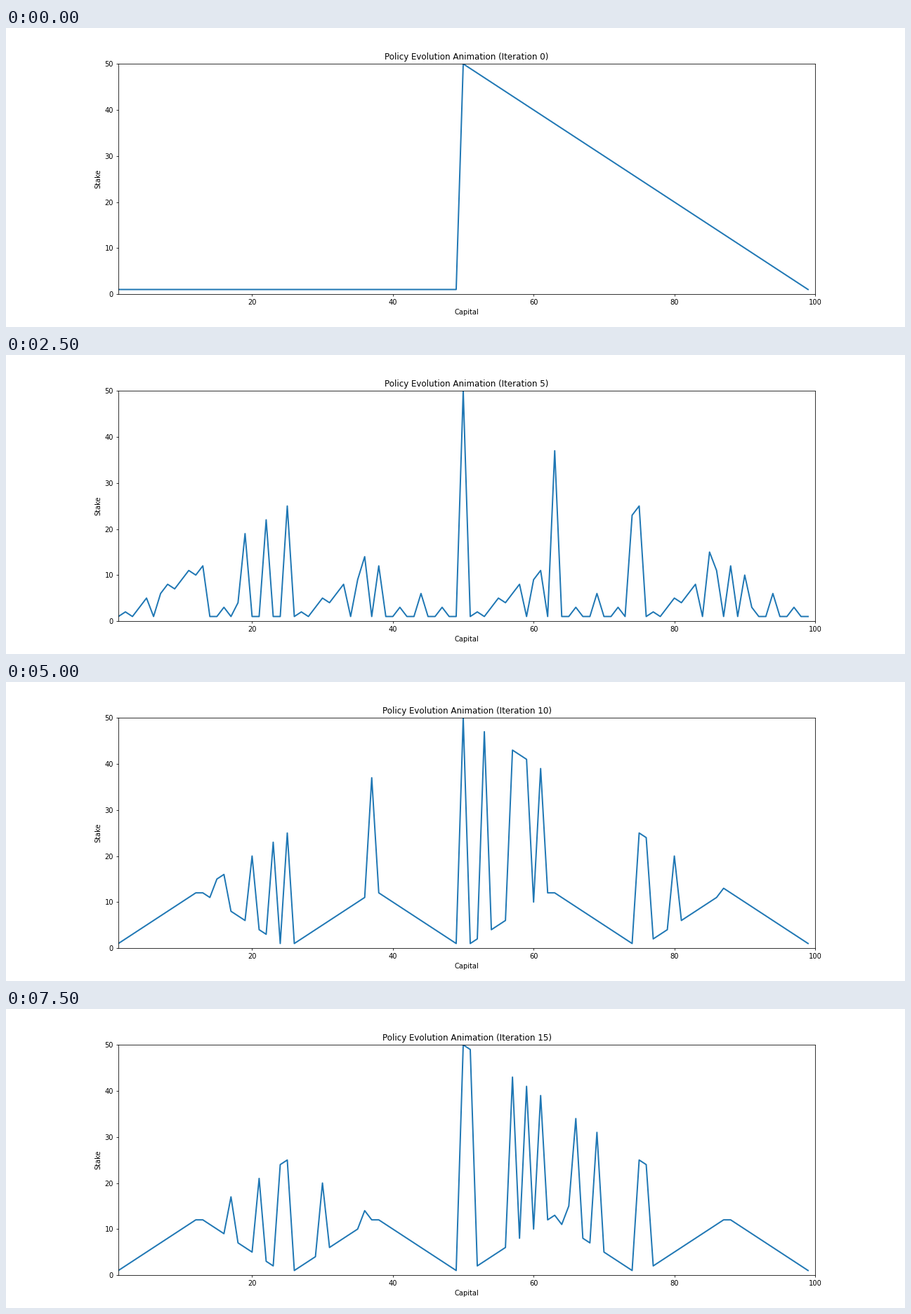
A matplotlib script for the animation above (8 s loop, 1280x427 px).

```python
import numpy as np
import matplotlib.pyplot as plt
from matplotlib.animation import FuncAnimation

WIDTH, HEIGHT = 1280, 427
DPI = WIDTH / 18
GOAL = 100
P_HEADS = 0.4
ITERATIONS = 16
INTERVAL = 500  # ms


def sweep(values):
    """One synchronous value-iteration sweep of the gambler's problem."""
    updated = values.copy()
    policy = np.zeros(GOAL - 1, dtype=int)
    for capital in range(1, GOAL):
        stakes = np.arange(1, min(capital, GOAL - capital) + 1)
        returns = (P_HEADS * values[capital + stakes]
                   + (1 - P_HEADS) * values[capital - stakes])
        best = np.argmax(returns)
        updated[capital] = returns[best]
        policy[capital - 1] = stakes[best]
    return updated, policy


def evolve(iterations):
    values = np.zeros(GOAL + 1)
    values[GOAL] = 1
    policies = []
    for _ in range(iterations):
        values, policy = sweep(values)
        policies.append(policy)
    return policies


policies = evolve(ITERATIONS)

plt.rcParams["font.family"] = "DejaVu Sans"
# The small margin keeps the pixel size from being truncated.
fig, ax = plt.subplots(
    figsize=((WIDTH + 1e-6) / DPI, (HEIGHT + 1e-6) / DPI), dpi=DPI)
ax.set(xlim=(1, GOAL), ylim=(0, 50), xlabel="Capital", ylabel="Stake")
line, = ax.plot([], [], lw=2, color="tab:blue")
title = ax.set_title("")


def update(iteration):
    line.set_data(np.arange(1, GOAL), policies[iteration])
    title.set_text(f"Policy Evolution Animation (Iteration {iteration})")
    return line, title


anim = FuncAnimation(fig, update, frames=ITERATIONS, interval=INTERVAL,
                     init_func=lambda: update(0), repeat=True,
                     repeat_delay=0, blit=False)
plt.show()
```
